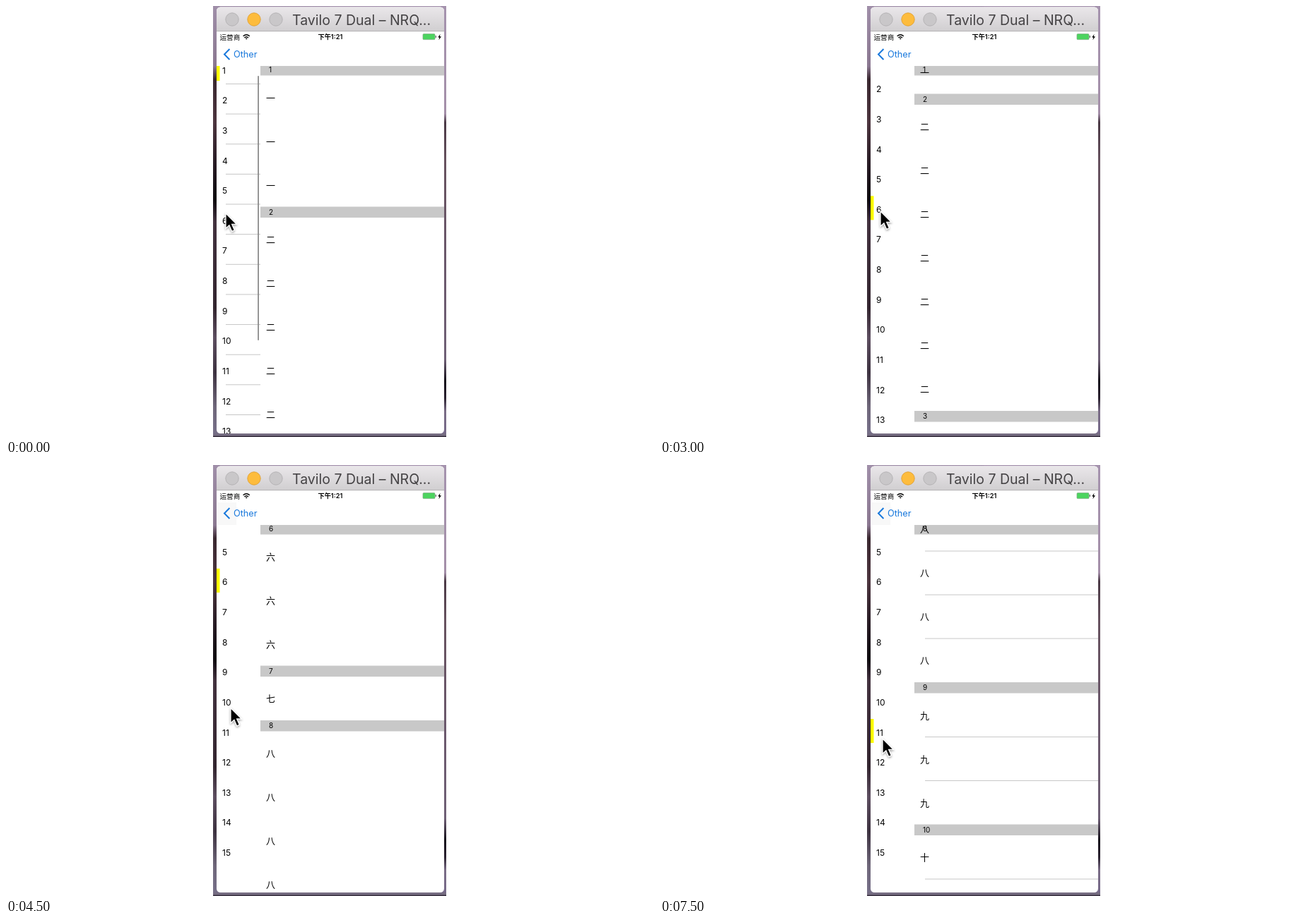
An HTML page for the animation above (8 s loop, 917x611 px).

```html
<!DOCTYPE html>
<html lang="zh">
<head>
<meta charset="utf-8">
<title>Linked lists</title>
<style>
  html, body { margin: 0; width: 100%; height: 100%; overflow: hidden; background: #fff; }
  svg { display: block; width: 917px; height: 611px; }
  text { font-family: Inter, "Noto Sans CJK SC", "Noto Sans CJK", sans-serif; fill: #000; }
  .cjk { font-family: "Noto Sans CJK SC", "Noto Sans CJK", sans-serif; }
</style>
</head>
<body>
<svg viewBox="0 0 917 611">
  <defs>
    <linearGradient id="bar" x2="0" y2="1">
      <stop offset="0" stop-color="#ebe8eb"/><stop offset="1" stop-color="#d0ced0"/>
    </linearGradient>
    <linearGradient id="wallL" x2="0" y2="1">
      <stop offset="0" stop-color="#a08fa9"/><stop offset=".14" stop-color="#8a7790"/>
      <stop offset=".17" stop-color="#3a2830"/><stop offset=".27" stop-color="#4d353f"/>
      <stop offset=".36" stop-color="#2a1d26"/><stop offset=".45" stop-color="#0d090e"/>
      <stop offset=".5" stop-color="#43323f"/><stop offset=".7" stop-color="#33252f"/>
      <stop offset=".77" stop-color="#5d4e60"/><stop offset=".85" stop-color="#3d3240"/>
      <stop offset=".93" stop-color="#6f677a"/><stop offset="1" stop-color="#77708a"/>
    </linearGradient>
    <linearGradient id="wallR" x2="0" y2="1">
      <stop offset="0" stop-color="#a593ae"/><stop offset=".25" stop-color="#a48fa9"/>
      <stop offset=".27" stop-color="#4a3945"/><stop offset=".36" stop-color="#67525f"/>
      <stop offset=".6" stop-color="#6b586c"/><stop offset=".82" stop-color="#6f6076"/>
      <stop offset=".87" stop-color="#15101a"/><stop offset=".91" stop-color="#2b2230"/>
      <stop offset=".94" stop-color="#7a6c86"/><stop offset="1" stop-color="#75698a"/>
    </linearGradient>
    <clipPath id="win"><rect x="298" y="1.5" width="322" height="604.5" rx="5.5"/></clipPath>
    <clipPath id="shot"><rect x="293" width="330" height="611"/></clipPath>
    <filter id="soft" x="-50%" y="-50%" width="200%" height="200%"><feDropShadow dx="0" dy="1.5" stdDeviation="1.4" flood-opacity=".4"/></filter>
  </defs>

  <rect x="293" width="165" height="611" fill="url(#wallL)"/>
  <rect x="458" width="165" height="611" fill="url(#wallR)"/>
  <rect x="293" y="606" width="330" height="5" fill="#766d82"/>
  <rect x="293" y="609.5" width="330" height="1.5" fill="#383040"/>

  <g clip-path="url(#win)">
    <rect x="298" width="322" height="611" fill="#fff"/>
    <g id="left"></g>
    <rect id="mark" x="298" width="4.5" height="34" fill="#ff0"/>
    <rect id="thumb" x="356.2" y="99" width="1.7" height="375" rx=".8" fill="#858585"/>
    <g id="heads"></g>
    <g id="right"></g>

    <rect x="298" y="36" width="322" height="49" fill="#fff"/>
    <rect id="tint" x="300" y="53" width="26" height="32" fill="#f8f8f8"/>
    <rect x="298" width="322" height="36" fill="url(#bar)"/>
    <rect x="298" y="35.2" width="322" height="1" fill="#b5b3b5"/>
    <g stroke-width="1">
      <circle cx="320" cy="19" r="9.2" fill="#c9c7c9" stroke="#b5b3b5"/>
      <circle cx="351" cy="19" r="9.2" fill="#fdbc3d" stroke="#e2a336"/>
      <circle cx="382" cy="19" r="9.2" fill="#c9c7c9" stroke="#b5b3b5"/>
    </g>
    <text x="405" y="26.5" font-size="19.5" style="fill:#454345">Tavilo 7 Dual – NRQ...</text>

    <text class="cjk" x="302.5" y="47.5" font-size="9.6">运营商</text>
    <g fill="none" stroke="#000" stroke-width="1.4">
      <path d="M335.6 42.8Q340.2 38.6 344.8 42.8M337.4 45Q340.2 42.4 343 45"/>
      <path d="M340.2 47.6l-1.5-1.7q1.5-1 3 0z" fill="#000" stroke="none"/>
    </g>
    <text x="441.5" y="47.3" font-size="9.2" font-weight="600">下午1:21</text>
    <rect x="590" y="39.6" width="17" height="8" rx="1.2" fill="#4cd45f" stroke="#7fa784" stroke-width=".7"/>
    <rect x="607.7" y="42" width="1.1" height="3.2" fill="#555"/>
    <path d="M614.6 39.8l-3.4 4.6h2.1l-.9 3.8 3.6-5h-2.2z"/>
    <path d="M316.4 61l-7.4 7.5 7.4 7.5" fill="none" stroke="#1878dc" stroke-width="2"/>
    <text x="322" y="73" font-size="12.7" style="fill:#1878dc">Other</text>
  </g>

  <g clip-path="url(#shot)">
    <circle id="ring" r="34" fill="none" stroke="#fff" stroke-width="4.5"/>
    <circle id="ring2" r="34" fill="none" stroke="#0a0a0a" stroke-width="2.4"/>
    <path id="arrow" d="M0 0V21.2L4.9 16.8L8.7 25.4L12.3 23.8L8.6 15.4H15.2Z"
      stroke="#fff" stroke-width="1.2" filter="url(#soft)"/>
  </g>
</svg>
<script>
const $ = id => document.getElementById(id);

function add(parent, tag, attrs, label) {
  const el = document.createElementNS('http://www.w3.org/2000/svg', tag);
  for (const key in attrs) el.setAttribute(key, attrs[key]);
  if (label !== undefined) el.textContent = label;
  parent.append(el);
  return el;
}
const show = (el, on) => el.setAttribute('opacity', +on);

const PITCH = 42.64, LEFT_TOP = 67.7, LEFT_MAX = 138.5;
const ROW = 62, HEAD = 15.5, PIN = 83;
const rowCounts = [3, 7, 5, 2, 4, 3, 1, 4, 3, 3, 2];
const numerals = '一二三四五六七八九十百';

const leftLines = add($('left'), 'g', {});
for (let i = 0; i < 15; i++) {
  const y = LEFT_TOP + i * PITCH;
  add($('left'), 'text', { x: 306, y: y + 27.9, 'font-size': 12 }, i + 1);
  add(leftLines, 'rect', { x: 311, y: y + PITCH - .4, width: 49, height: 1, fill: '#c6c6c6' });
}

const rightLines = add($('right'), 'g', {});
let next = PIN;
const sections = rowCounts.map((rows, i) => {
  const top = next;
  const head = add($('heads'), 'g', {});
  add(head, 'rect', { x: 360, width: 260, height: HEAD, fill: '#c8c8c8' });
  add(head, 'text', { x: 372, y: 11.4, 'font-size': 10 }, i + 1);
  for (let r = 0; r < rows; r++) {
    const y = top + HEAD + r * ROW;
    add($('right'), 'text', { class: 'cjk', x: 368, y: y + 36, 'font-size': 13 }, numerals[i]);
    if (r < rows - 1)
      add(rightLines, 'rect', { x: 375, y: y + ROW - .5, width: 245, height: 1, fill: '#c8c8c8' });
  }
  next = top + HEAD + rows * ROW;
  return { head, top, end: next };
});

// one pose per half second: cursor x, y, left scroll, right scroll
const STEP = 500;
const poses = [
  [311, 294, 0, 0], [311, 288, 0, 0], [311, 284, 0, 0], [311, 283, 0, 0],
  [311, 283, 0, 0], [311, 283, 0, 0], [312, 291, 16, 160], [314, 306, 81.3, 801.5],
  [316, 326, 128, 1275], [318, 344.5, LEFT_MAX, 1379.5], [316, 390, LEFT_MAX, 1379.5],
  [315, 390, LEFT_MAX, 1379.5], [315, 388, LEFT_MAX, 1379.5], [315, 388, LEFT_MAX, 1379.5],
  [315, 388, LEFT_MAX, 1435.5], [315, 388, LEFT_MAX, 1697]
];
const clicks = [4, 12, 13];
const thumbFade = [1, .55, .1];

function draw(n) {
  const [x, y, left, right] = poses[n];
  const picked = n < 6 ? 0 : n < 14 ? 5 : 10;

  $('left').setAttribute('transform', `translate(0 ${-left})`);
  $('right').setAttribute('transform', `translate(0 ${-right})`);
  $('mark').setAttribute('y', LEFT_TOP + picked * PITCH + 4.4 - left);
  for (const { head, top, end } of sections) {
    const at = Math.min(Math.max(top - right, PIN), end - right - HEAD);
    head.setAttribute('transform', `translate(0 ${at})`);
  }
  show(leftLines, n < 6);
  show(rightLines, n >= 14);
  show($('tint'), n >= 8);
  show($('thumb'), thumbFade[n] || 0);

  const spot = `translate(${x} ${y})`;
  $('arrow').setAttribute('transform', spot);
  for (const id of ['ring', 'ring2']) {
    $(id).setAttribute('transform', `translate(${x} ${y + 1})`);
    show($(id), clicks.includes(n));
  }
}

const start = performance.now();
let shown = -1;
function tick() {
  const n = Math.floor((performance.now() - start) / STEP) % poses.length;
  if (n !== shown) draw(shown = n);
  requestAnimationFrame(tick);
}
tick();
</script>
</body>
</html>
```
